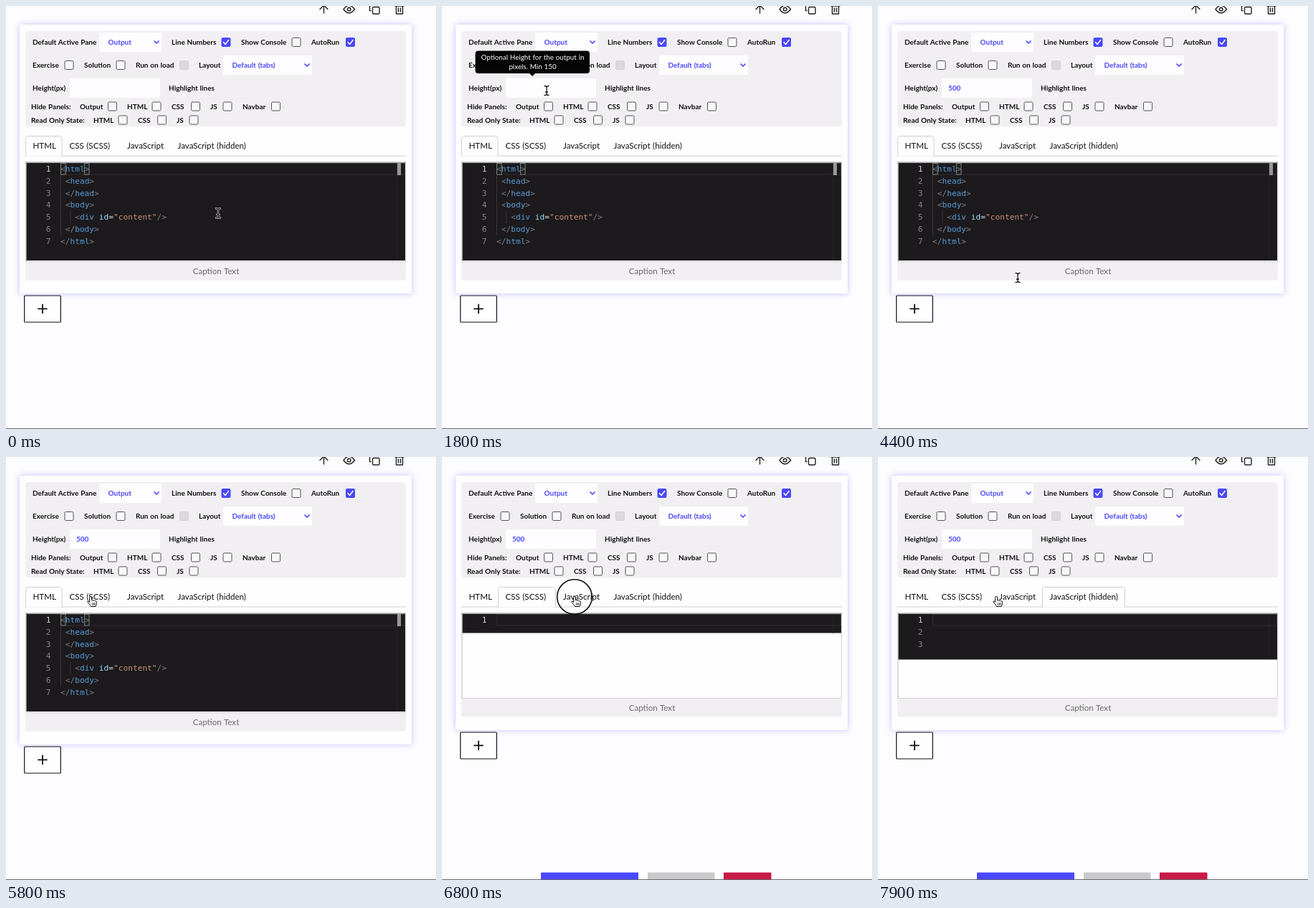
An HTML page for the animation above (8 s loop, 600 by 590 pixels).

```html
<!DOCTYPE html>
<html lang="en">
<head>
<meta charset="utf-8">
<title>Code block settings</title>
<style>
  html, body { margin: 0; width: 100%; height: 100%; overflow: hidden; background: #fdfcff; }
  svg { display: block; width: 600px; height: 590px; }
  text { font-family: Lato, "Open Sans", sans-serif; font-size: 11.6px; white-space: pre; word-spacing: .04em; }
  .label { font-size: 10px; font-weight: 700; }
  .tip { font-size: 9.8px; fill: #fff; text-anchor: middle; }
  .code { font-family: "DejaVu Sans Mono", monospace; font-size: 11.18px; word-spacing: 0; }
  .glow { filter: drop-shadow(0 0 4px rgba(80, 80, 255, .34)); }
</style>
</head>
<body>
<svg id="stage" viewBox="0 0 600 590"></svg>
<script>
const LOOP = 8000, BLUE = '#4a48fb', PANEL = '#f1eff2', INK = '#111', DARK = '#1c1a1d';
const LINE = 16.79, CHAR = 6.73, CODE_X = 76, CODE_INK = '#e2e1e3';
const stage = document.getElementById('stage');

function add(parent, tag, attrs = {}, content = '') {
  const node = document.createElementNS('http://www.w3.org/2000/svg', tag);
  for (const key in attrs) node.setAttribute(key, attrs[key]);
  node.textContent = content;
  parent.append(node);
  return node;
}
const group = (parent = stage) => add(parent, 'g');
const rect = (parent, x, y, width, height, fill, more) =>
  add(parent, 'rect', { x, y, width, height, fill, ...more });
const path = (parent, d, stroke, width = 1, fill = 'none') =>
  add(parent, 'path', { d, stroke, fill, 'stroke-width': width, 'stroke-linecap': 'round', 'stroke-linejoin': 'round' });
const text = (parent, x, y, content, fill = INK, more) => add(parent, 'text', { x, y, fill, ...more }, content);
const label = (x, y, content, fill) => text(stage, x, y + 3.7, content, fill, { class: 'label' });
const show = (node, on) => node.setAttribute('visibility', on ? 'visible' : 'hidden');

function checkbox(x, y, state) {
  const fill = { on: BLUE, off: '#f8f7fa', disabled: '#dbd9dc' }[state];
  const stroke = { on: BLUE, off: '#555', disabled: '#d3d1d4' }[state];
  rect(stage, x - 6, y - 6, 12, 12, fill, { stroke, rx: 1.5 });
  if (state === 'on') path(stage, `M${x - 3.5} ${y}l2.5 3 4.7-6`, '#fff', 1.5);
}

function select(x, y, width, content) {
  rect(stage, x, y - 13.5, width, 27, '#fdfcff', { rx: 2 });
  label(x + 12.5, y, content, BLUE);
  path(stage, `M${x + width - 10} ${y - 1.5}l3 3 3-3`, BLUE, 1.7);
}

// Page layers
rect(stage, 0, 0, 600, 590, '#fdfcff');
const footer = group();
[[138, 136, BLUE], [287, 93.5, '#c9c8ca'], [393, 66.5, '#c91a47']]
  .forEach(([x, w, color]) => rect(footer, x, 579.5, w, 12, color, { rx: 1 }));
const card = rect(stage, 19, 26, 547, 375, '#fefdff', { class: 'glow', rx: 2 });

// Toolbar icons
path(stage, 'M443.5 10V-1M438 4.5l5.5-5.5 5.5 5.5', '#222', 1.4);
path(stage, 'M471 4.5Q478.5-6 486.5 4.5Q478.5 15 471 4.5Z', '#222', 1.4);
add(stage, 'circle', { cx: 478.7, cy: 4.5, r: 2.3, fill: 'none', stroke: '#222', 'stroke-width': 1.4 });
rect(stage, 511.5, 1.5, 9.5, 9.5, 'none', { stroke: '#222', 'stroke-width': 1.4, rx: 1.5 });
path(stage, 'M509 6.500h-1.500V-4', '#222', 1.4);
path(stage, 'M543 0h12M544.5 0v11h9V0M547.5 3v5M550.5 3v5', '#222', 1.4);

// Settings
rect(stage, 27, 35, 531, 133.5, PANEL, { rx: 4 });
[[37, 50, 'Default Active Pane'], [231, 50, 'Line Numbers'], [328, 50, 'Show Console'], [426, 50, 'AutoRun'],
 [37, 82.5, 'Exercise'], [109, 82.5, 'Solution'], [181, 82.5, 'Run on load'], [269, 82.5, 'Layout'],
 [37, 114.5, 'Height(px)'], [227, 114.5, 'Highlight lines'],
 [35, 140, 'Hide Panels:'], [103, 140, 'Output'], [169, 140, 'HTML'], [231, 140, 'CSS'], [285, 140, 'JS'], [330, 140, 'Navbar'],
 [35, 159, 'Read Only State:'], [122, 159, 'HTML'], [184, 159, 'CSS'], [238, 159, 'JS']]
  .forEach(item => label(...item));
select(130, 50.5, 87, 'Output');
select(303, 82.5, 124, 'Default (tabs)');
[[307, 50.5, 'on'], [405, 50.5], [480.5, 50.5, 'on'], [88, 82.5], [160, 82.5], [248.5, 82.5, 'disabled'],
 [148.5, 140], [210, 140], [264.5, 140], [309, 140], [376.5, 140], [163, 159], [217.5, 159], [262, 159]]
  .forEach(([x, y, state = 'off']) => checkbox(x, y, state));
rect(stage, 89, 101, 126, 27, '#fdfcff', { rx: 2 });
const height = label(98, 114.5, '', BLUE);
const caret = rect(stage, 98, 108, 1.2, 13, BLUE);

// Editors
const tokenColors = [
  [/^(<\/?|\/?>)$/, '#808080'], [/^["']/, '#ce9178'], [/^id$/, '#9cdcfe'],
  [/^(html|head|body|div|function)$/, '#569cd6']];

function drawLine(parent, source, row, comment) {
  const indent = source.search(/\S/);
  if (indent < 0) return;
  for (let column = 0; column < indent; column += 2)
    rect(parent, CODE_X + column * CHAR, 219 + row * LINE, 1, LINE, '#39373a');
  const line = text(parent, CODE_X + indent * CHAR, 231 + row * LINE, '', CODE_INK, { class: 'code' });
  const tokens = comment ? [source.trim()] : source.trim().match(/<\/?|\/?>|"[^"]*"|'[^']*'|\w+|[^\w<>"'\/]+|./g);
  for (const token of tokens) {
    const rule = tokenColors.find(([pattern]) => pattern.test(token));
    add(line, 'tspan', { fill: comment ? '#5a9244' : rule ? rule[1] : CODE_INK }, token);
  }
}

const htmlCode = `<html>
 <head>
 </head>
 <body>
   <div id="content"/>
 </body>
</html>`;
const jsCode = `document.addEventListener("DOMContentLoaded", function () {
  pTag = document.querySelector("div");
  newVal = document.createElement("p");
  newVal.innerHTML = 'Hello, Hello';
  pTag.appendChild(newVal);
});

// Async Tests Example
/*
window.onModulesLoaded = new Promise( function( resolve, reject ) {
  setTimeout(function() {
    pTag = document.querySelector("div");
    pTag.innerHTML = '';
    newVal = document.createElement("p");
    newVal.innerHTML = 'Hello World';
    pTag.appendChild(newVal);
    resolve();
  }, 100)
});
*/`;

const tabs = [
  { name: 'HTML', x: 27, end: 78, code: htmlCode, dark: 355, bottom: 357 },
  { name: 'CSS (SCSS)', x: 78, end: 158.5, code: '', dark: 245.5, bottom: 337 },
  { name: 'JavaScript', x: 158.5, end: 229, code: jsCode, dark: 620, bottom: 622, comments: 7 },
  { name: 'JavaScript (hidden)', x: 229, end: 344.5, code: '\n\n', dark: 282.5, bottom: 337 }];

path(stage, 'M27 209H558', '#cfced2');
for (const tab of tabs) {
  const view = tab.view = group();
  path(view, `M${tab.x + .5} 209.5V185q0-3.5 3.5-3.5H${tab.end - 3.5}q3.5 0 3.5 3.5V209.5`, '#cfced2', 1, '#fefdff');
  rect(view, 27, 217.5, 531, tab.bottom - 217.5, '#d0cfd2');
  rect(view, 27, 217.5, 531, 1.5, '#a9a8ab');
  rect(view, 28.5, 219, 528.5, tab.bottom - 220, '#fefdff');
  rect(view, 28.5, 219, 528.5, tab.dark - 219, DARK);
  rect(view, CODE_X + .5, 219.5, 480, 15.5, 'none', { stroke: '#302e31' });
  if (tab.code !== jsCode) rect(view, 545.5, 219, 1, tab.dark - 219, '#29272a');
  if (tab.code === htmlCode) {
    [76.5, 109.5].forEach(x => rect(view, x, 219.5, 6.5, 15.5, '#1c221d', { stroke: '#807f81' }));
    rect(view, 546, 219, 5, 17, '#99979a');
  }
  tab.code.split('\n').forEach((source, row) => {
    text(view, 62.5, 231 + row * LINE, row + 1, row ? '#858487' : '#d0cfd1', { class: 'code', 'text-anchor': 'end' });
    drawLine(view, source, row, row >= tab.comments);
  });
}
tabs.forEach(tab => text(stage, tab.x + 10.5, 199.2, tab.name));

const below = group();
rect(below, 27, 357, 531, 25.5, PANEL, { rx: 3 });
text(below, 293, 373.6, 'Caption Text', '#6c6a6e', { 'text-anchor': 'middle' });
const plus = group(below);
rect(plus, 25.7, 404, 50.6, 37, '#fefdff', { stroke: INK, 'stroke-width': 1.2, rx: 1 });
path(plus, 'M45 422.3h12M51 416.3v12', INK, 1.8);
rect(stage, 0, 589, 600, 1, '#6a696c');

// Tooltip
const tooltip = group();
rect(tooltip, 46.5, 62.5, 159.5, 31.5, '#050505', { rx: 4 });
path(tooltip, 'M122 94h8l-4 4z', 'none', 0, '#050505');
text(tooltip, 126.5, 75, 'Optional Height for the output in', '#fff', { class: 'tip' });
text(tooltip, 126.5, 88, 'pixels. Min 150', '#fff', { class: 'tip' });

// Pointer, with its hot spot at the origin
const pointer = group();
const ring = add(pointer, 'circle', { r: 24.3, fill: 'none', stroke: INK, 'stroke-width': 1.6 });
const shapes = { beam: group(pointer), hand: group(pointer), arrow: group(pointer) };
const beam = 'M-3-6.5Q0-6.5 0-4.5Q0-6.5 3-6.5M0-4.5V4.5M-3 6.5Q0 6.5 0 4.5Q0 6.5 3 6.5M-1.5 2h3';
path(shapes.beam, beam, '#fff', 2.4);
path(shapes.beam, beam, INK, 1.3);
path(shapes.hand, 'M-1.5 1Q-1.5-.5 0-.5T1.5 1V5Q3 4 4 5.5Q5.5 4.5 6.5 6Q8.5 5.5 8.5 7.5V9.5Q8.5 11.5 7 13.5H.5Q0 12-1 11L-4 7.5Q-4.5 5.5-2.8 6L-1.5 7.5Z', INK, 1, '#fff');
path(shapes.hand, 'M2.5 8.5v3M4.5 8.5v3M6.2 8.5v3', INK, .8);
path(shapes.arrow, 'M0 0V12L3 9.5L5 14L7 13L5 8.8H9Z', '#fff', 1, INK);

// Timeline: [time, value...] keys
const cursorKeys = [
  [0, 296, 289], [200, 296, 289], [1000, 149, 119], [1300, 146, 118], [3700, 146, 118],
  [4400, 195, 379], [4600, 186, 334], [5500, 130, 235], [5800, 118, 195], [6300, 118, 195],
  [6700, 179, 195], [6900, 191, 195], [7200, 191, 195], [7500, 269, 193.5], [7700, 269, 193.5], [7900, 165, 195]];
const tipKeys = [[900, 0], [1000, .32], [1200, 1], [3800, 1], [4100, 0]];
const plusKeys = [[600, 1], [900, .3], [1000, .3], [1300, 1]];
const clicks = [2200, 5900, 6800, 7500];
const tabTimes = [0, 6100, 7000, 7700];
const typing = [3100, 3300, 3500];

function track(keys, time) {
  const next = keys.findIndex(key => key[0] > time);
  if (next <= 0) return (next ? keys[keys.length - 1] : keys[0]).slice(1);
  const [from, to] = [keys[next - 1], keys[next]];
  const p = (time - from[0]) / (to[0] - from[0]);
  const eased = p * p * (3 - 2 * p);
  return from.slice(1).map((value, i) => value + (to[i + 1] - value) * eased);
}

function pointerShape(x, y) {
  const inField = x > 89 && x < 215 && y > 101 && y < 128;
  if (inField || y > 218) return 'beam';
  return y > 181 && y < 209 ? 'hand' : 'arrow';
}

function draw(time) {
  const active = tabTimes.filter(start => start <= time).length - 1;
  const tab = tabs[active];
  tabs.forEach((item, i) => show(item.view, i === active));
  const shift = tab.bottom - 357;
  below.setAttribute('transform', `translate(0 ${shift})`);
  card.setAttribute('height', 375 + shift);
  show(footer, shift < 0);

  const typed = '500'.slice(0, typing.filter(start => start <= time).length);
  height.textContent = typed;
  caret.setAttribute('x', 98 + typed.length * 6);
  show(caret, time >= 2300 && time < 4000 && (time - 2300) % 1000 < 700);

  tooltip.setAttribute('opacity', track(tipKeys, time)[0]);
  plus.setAttribute('opacity', track(plusKeys, time)[0]);

  const [x, y] = track(cursorKeys, time);
  pointer.setAttribute('transform', `translate(${x} ${y})`);
  for (const name in shapes) show(shapes[name], name === pointerShape(x, y));
  show(ring, clicks.some(start => time >= start && time < start + 200));
}

const begin = performance.now();
function tick() {
  const time = (performance.now() - begin) % LOOP;
  draw(Math.floor(time / 100) * 100);
  requestAnimationFrame(tick);
}
tick();
</script>
</body>
</html>
```
